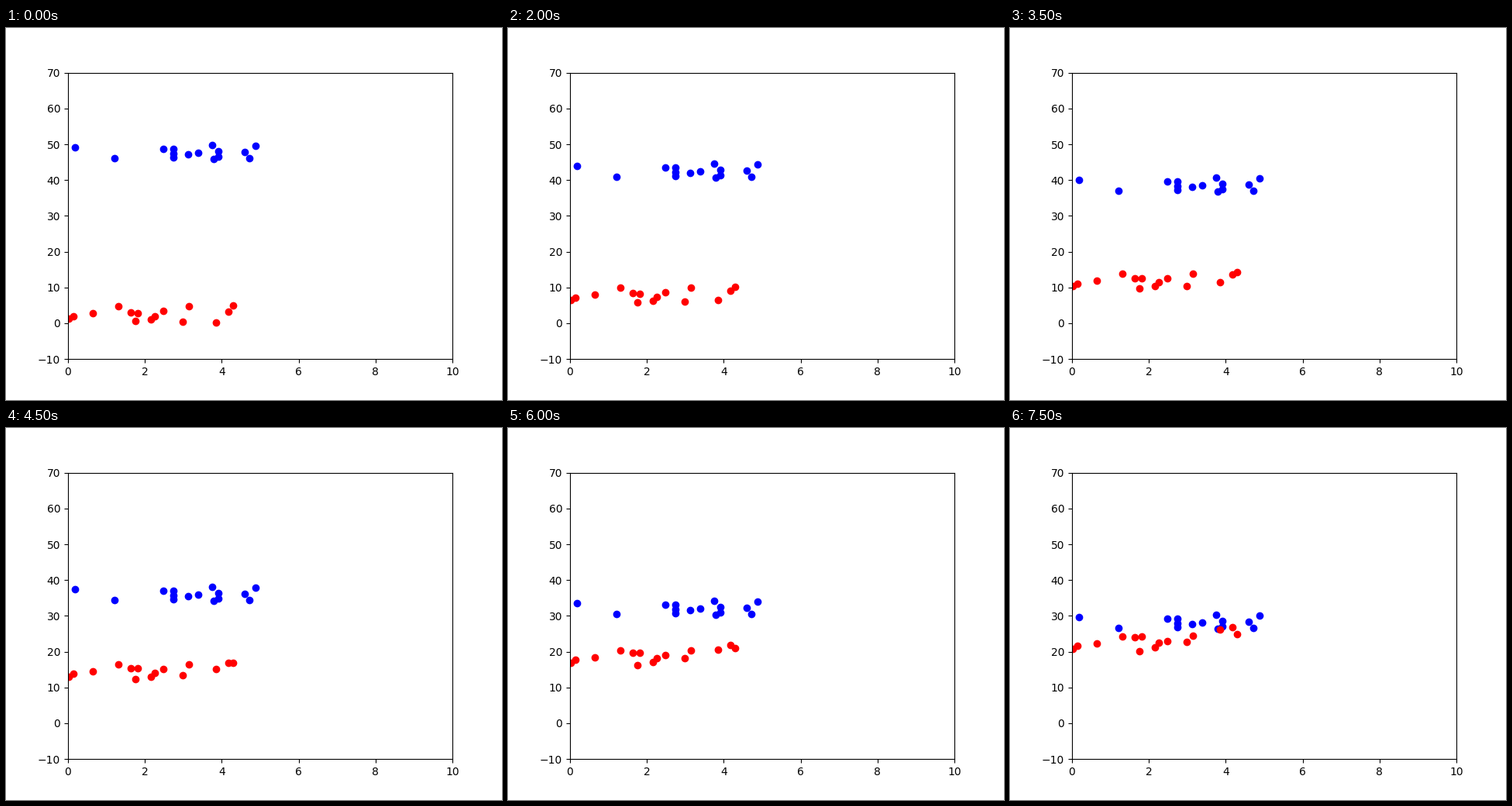
Write a matplotlib script that moves like this. It is 640 by 480 pixels and loops after 8000 ms.

```python
import numpy as np
import matplotlib.pyplot as plt
from matplotlib.animation import FuncAnimation

FRAMES = 16
INTERVAL = 500
SPEED = 1.3      # climb or fall per step
EASE = 1.4       # how the extra climb gathers pace

# Starting points (x, y)
falling = np.array([
    (0.18, 49.13), (1.21, 46.10), (2.48, 48.70), (2.74, 48.70), (2.74, 47.40),
    (2.74, 46.32), (3.13, 47.19), (3.39, 47.62), (3.75, 49.78), (3.79, 45.89),
    (3.91, 48.05), (3.91, 46.54), (4.60, 47.84), (4.72, 46.10), (4.88, 49.57),
])

# Starting points and the extra height gained by the last step (x, y, gain)
rising = np.array([
    (0.02, 1.30, 0), (0.14, 1.95, 0.2), (0.65, 2.81, 0), (1.31, 4.76, 0),
    (1.63, 3.03, 1.4), (1.75, 0.65, 0), (1.81, 2.81, 1.9), (2.16, 1.08, 0.6),
    (2.26, 1.95, 1.0), (2.48, 3.46, 0), (2.98, 0.43, 2.8), (3.15, 4.76, 0.1),
    (3.85, 0.22, 6.4), (4.17, 3.25, 4.0), (4.29, 4.98, 0.5),
])

fig, ax = plt.subplots(figsize=(6.4, 4.8), dpi=100)
ax.set(xlim=(0, 10), ylim=(-10, 70))
blue, = ax.plot([], [], "o", color="blue")
red, = ax.plot([], [], "o", color="red")


def update(step):
    x, y = falling.T
    blue.set_data(x, y - SPEED * step)
    x, y, gain = rising.T
    red.set_data(x, y + SPEED * step + gain * (step / (FRAMES - 1)) ** EASE)
    return blue, red


anim = FuncAnimation(fig, update, frames=FRAMES, interval=INTERVAL,
                     repeat=True, repeat_delay=0)
plt.show()
```
